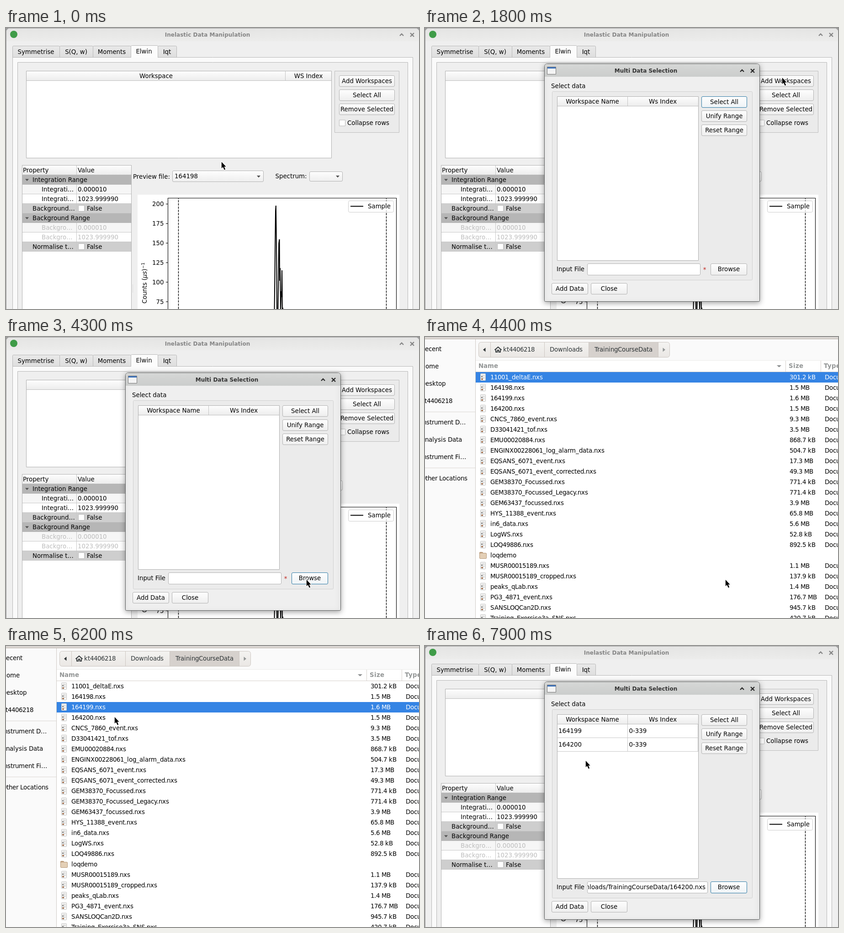
Write an HTML page with a canvas that moves like this. It is 904 px wide and 617 px high and loops after 8000 ms.

```html
<!DOCTYPE html>
<html lang="en">
<head>
<meta charset="utf-8">
<title>Adding workspaces</title>
<style>
html, body { margin: 0; width: 100%; height: 100%; overflow: hidden; background: #efefef; }
canvas { display: block; width: 904px; height: 617px; }
</style>
</head>
<body>
<canvas id="stage" width="904" height="617"></canvas>
<script>
const c = document.getElementById('stage').getContext('2d');
const LOOP = 8000, STEP = 100;
const FAMILY = '"DejaVu Sans", sans-serif';
const UI = `13.33px ${FAMILY}`, UI_BOLD = `bold 13.33px ${FAMILY}`, TITLE = `bold 12px ${FAMILY}`;

// ---------- drawing helpers ----------
function text(str, x, middle, { font = UI, color = '#000', align = 'left' } = {}) {
  c.font = font;
  c.fillStyle = color;
  c.textAlign = align;
  c.fillText(str, x, Math.floor(middle + 5));
}
const centered = (str, x, y, options) => text(str, x, y, { ...options, align: 'center' });

// Text whose glyphs all advance by whole pixels.
function snapped(str, x, middle, options) {
  const width = s => c.measureText(s).width;
  [...str].forEach((glyph, i) => {
    text(glyph, x, middle, options);
    const next = str[i + 1] ?? '';
    x += Math.round(width(glyph + next) - width(next));
  });
}

function fill(x1, y1, x2, y2, color) {
  c.fillStyle = color;
  c.fillRect(x1, y1, x2 - x1, y2 - y1);
}
function box(x1, y1, x2, y2, color, border, radius = 0) {
  c.beginPath();
  c.roundRect(x1 + .5, y1 + .5, x2 - x1 - 1, y2 - y1 - 1, radius);
  c.fillStyle = color;
  c.fill();
  c.strokeStyle = border;
  c.lineWidth = 1;
  c.stroke();
}
function path(points, color, width, close) {
  c.beginPath();
  points.forEach(([x, y]) => c.lineTo(x, y));
  if (close) c.closePath();
  c.strokeStyle = color;
  c.lineWidth = width;
  c.stroke();
}
function shape(points, color) {
  c.beginPath();
  points.forEach(([x, y]) => c.lineTo(x, y));
  c.fillStyle = color;
  c.fill();
}
const hline = (x1, x2, y, color) => fill(x1, y, x2, y + 1, color);
const vline = (x, y1, y2, color) => fill(x, y1, x + 1, y2, color);
const downArrow = (x, y, color = '#505050', w = 4) => shape([[x - w, y - 2], [x + w, y - 2], [x, y + 2.5]], color);

function shade(y1, y2, top, bottom) {
  const g = c.createLinearGradient(0, y1, 0, y2);
  g.addColorStop(0, top);
  g.addColorStop(1, bottom);
  return g;
}

// ---------- widgets ----------
function button(label, x1, y1, x2, y2 = y1 + 25, focused = false) {
  box(x1, y1, x2, y2, shade(y1, y2, '#fefefe', focused ? '#eef3f6' : '#eeeeee'), focused ? '#2f7ba6' : '#b3b3b3', 2.5);
  centered(label, (x1 + x2) / 2, (y1 + y2) / 2 - .5);
}
function combo(label, x1, y1, x2, y2) {
  button('', x1, y1, x2, y2);
  text(label, x1 + 5, 325.5);
  downArrow(x2 - 11, 326);
}
function checkbox(x, middle, label, labelX) {
  box(x, middle - 7, x + 14, middle + 7, '#fff', '#bababa');
  text(label, labelX, middle);
}
function header(x1, y1, x2, y2, divider) {
  fill(x1, y1, x2, y2, shade(y1, y2, '#fdfdfd', '#ededed'));
  hline(x1, x2, y2, '#bdbdbd');
  vline(divider, y1, y2, '#c4c4c4');
}
function windowButtons(x, y, color) {
  path([[x - 4, y + 2], [x, y - 2], [x + 4, y + 2]], color, 2.4);
  path([[x + 19, y - 4], [x + 27, y + 4]], color, 2.4);
  path([[x + 27, y - 4], [x + 19, y + 4]], color, 2.4);
}

// ---------- main window ----------
function propertyTree() {
  fill(35, 301, 275, 617, '#b4b4b4');
  fill(36, 302, 274, 617, '#fff');
  header(36, 302, 274, 322, 154);
  text('Property', 37, 312);
  text('Value', 157, 312);
  const rows = [
    ['group', 'Integration Range'], ['item', 'Integrati…', '0.000010'], ['item', 'Integrati…', '1023.999990'],
    ['flag', 'Background…'],
    ['group', 'Background Range'], ['off', 'Backgro…', '0.000010'], ['off', 'Backgro…', '1023.999990'],
    ['flag', 'Normalise t…']
  ];
  rows.forEach(([kind, name, value], i) => {
    const top = 323 + 21 * i, mid = top + 10.5;
    if (kind === 'group') {
      fill(36, top, 274, top + 21, '#b6b6b6');
      downArrow(46, mid);
      text(name, 58, mid);
      return;
    }
    fill(36, top, 274, top + 21, kind === 'flag' ? '#cecece' : i % 4 === 1 ? '#f6f6f6' : '#fff');
    hline(36, 274, top + 20, '#c8c8c8');
    vline(154, top, top + 21, '#c8c8c8');
    if (kind === 'flag') {
      text(name, 58, mid);
      checkbox(158, mid - .5, 'False', 177);
    } else {
      const color = kind === 'off' ? '#bdbdbd' : '#000';
      text(name, 78, mid, { color });
      text(value, 157, mid, { color });
    }
  });
}

function axisTitle() {
  c.save();
  c.translate(307.5, 605);
  c.rotate(-Math.PI / 2);
  let x = 0;
  const parts = [['Counts (', '', 13.3, 0], ['µs', 'italic ', 13.3, 0], [')', '', 13.3, 0], ['−1', '', 9.3, -5]];
  for (const [str, style, size, rise] of parts) {
    text(str, x, rise - 5, { font: `${style}${size}px ${FAMILY}` });
    x += c.measureText(str).width;
  }
  c.restore();
}

function plot() {
  fill(288, 366, 861, 617, '#fff');
  c.setLineDash([5, 2.1]);
  for (const x of [377.5, 832.5]) path([[x, 617], [x, 374]], '#000', 1.33);
  c.setLineDash([]);
  path([[587.5, 622], [590, 402], [590.8, 390], [592, 480], [593, 622], [595.3, 622], [597.2, 473],
    [598.5, 464], [599, 555], [600, 527], [601.2, 622], [602.5, 578], [603.3, 591], [604, 532],
    [605, 622], [605.7, 614], [606.5, 622]], '#000', 2);
  path([[354.5, 620], [354.5, 373.5], [854.5, 373.5], [854.5, 620]], '#000', 1.1);
  for (let i = 0; i < 6; i++) {
    const y = 386.5 + 42.9 * i;
    path([[350, y], [354, y]], '#000', 1.1);
    text(200 - 25 * i, 345.5, y, { align: 'right' });
  }
  axisTitle();
  box(749, 379, 849, 405, 'rgba(255,255,255,.8)', '#cccccc', 3);
  path([[754, 391.5], [782, 391.5]], '#000', 2);
  text('Sample', 792, 391.5);
}

function mainWindow() {
  fill(0, 0, 904, 617, '#9c9c9c');
  c.beginPath();
  c.roundRect(1, 1, 903, 640, [7, 7, 0, 0]);
  c.fillStyle = '#efefef';
  c.fill();
  c.beginPath();
  c.roundRect(1, 1, 903, 28, [7, 7, 0, 0]);
  c.fillStyle = shade(0, 29, '#e4e4e3', '#ececeb');
  c.fill();
  c.beginPath();
  c.arc(17, 14, 8, 0, 7);
  c.fillStyle = '#3f9c48';
  c.fill();
  centered('Inelastic Data Manipulation', 441, 14, { font: TITLE, color: '#858585' });
  windowButtons(866, 15, '#858585');

  box(14, 64, 891, 640, '#fafafa', '#b8b8b8');
  const tabs = [['Symmetrise', 14, 118], ['S(Q, w)', 117, 191], ['Moments', 190, 274], ['Iqt', 332, 374]];
  for (const [name, x1, x2] of tabs) {
    box(x1, 39, x2, 65, shade(39, 65, '#e9e9e9', '#dedede'), '#b8b8b8', [2, 2, 0, 0]);
    centered(name, (x1 + x2) / 2 - .5, 52);
  }
  box(273, 38, 333, 68, '#fcfcfc', '#b8b8b8', [2, 2, 0, 0]);
  fill(273, 65, 333, 69, '#fafafa');
  centered('Elwin', 302, 51.5);

  box(25, 75, 880, 640, '#efefef', '#b8b8b8');
  box(44, 94, 713, 286, '#fff', '#b0b0b0');
  header(45, 95, 712, 115, 611);
  centered('Workspace', 328.5, 105);
  centered('WS Index', 662, 105);

  box(719, 94, 861, 230, '#ebebeb', '#bdbdbd');
  ['Add Workspaces', 'Select All', 'Remove Selected'].forEach((name, i) => button(name, 729, 104 + 31 * i, 851));
  checkbox(729, 208.5, 'Collapse rows', 747);

  propertyTree();
  for (let y = 564; y < 581; y += 3) fill(277, y, 278, y + 1, '#b8b8b8');
  text('Preview file:', 278, 326);
  combo('164198', 364, 313, 564, 338);
  text('Spectrum:', 589.5, 325.5);
  combo('', 664, 315, 737, 337);
  plot();
}

// ---------- selection dialog ----------
function selectionDialog({ focus, path: filePath, rows }) {
  c.save();
  c.shadowColor = 'rgba(0,0,0,.35)';
  c.shadowBlur = 12;
  c.shadowOffsetY = 3;
  box(261, 78, 733, 601, '#efefef', '#5c5e5e', [6, 6, 2, 2]);
  c.restore();
  c.beginPath();
  c.roundRect(262, 79, 470, 28, [5, 5, 0, 0]);
  c.fillStyle = shade(79, 107, '#d6d7d6', '#cbcdcc');
  c.fill();
  box(267, 85, 287, 102, '#f4f4f4', '#777');
  fill(268, 86, 286, 89, '#3f74bd');
  centered('Multi Data Selection', 483.5, 93.5, { font: TITLE, color: '#333' });
  windowButtons(694, 94, '#2b2b2b');

  text('Select data', 276, 127.5);
  box(278, 139, 717, 554, '#ebebeb', '#d0d0d0', 2);
  box(289, 150, 599, 511, '#fff', '#b0b0b0');
  header(290, 151, 598, 171, 443);
  centered('Workspace Name', 366.5, 161);
  centered('Ws Index', 520.5, 161);
  rows.forEach((name, i) => {
    const top = 172 + 30 * i;
    text(name, 292, top + 14.5);
    text('0-339', 446.5, top + 14.5);
    hline(290, 598, top + 29, '#c8c8c8');
    vline(443, top, top + 30, '#c8c8c8');
    vline(597, top, top + 30, '#c8c8c8');
  });
  ['Select All', 'Unify Range', 'Reset Range'].forEach((name, i) =>
    button(name, 605, 150 + 31 * i, 705, undefined, focus === name));

  text('Input File', 288, 529.5);
  const right = filePath ? 619 : 603;
  box(355, 517, right, 543, '#fff', '#b3b3b3', 2.5);
  if (filePath) {
    c.save();
    c.beginPath();
    c.rect(356, 518, right - 358, 24);
    c.clip();
    text(filePath, right - 5, 529.5, { align: 'right' });
    c.restore();
  } else {
    centered('*', 612, 530, { color: '#c0241c' });
  }
  button('Browse', 625, 517, 705, 543, focus === 'Browse');
  button('Add Data', 277, 560, 357);
  button('Close', 363, 560, 443);
}

// ---------- file chooser ----------
const files = `11001_deltaE.nxs 301.2 kB|164198.nxs 1.5 MB|164199.nxs 1.6 MB|164200.nxs 1.5 MB
CNCS_7860_event.nxs 9.3 MB|D33041421_tof.nxs 3.5 MB|EMU00020884.nxs 868.7 kB
ENGINX00228061_log_alarm_data.nxs 504.7 kB|EQSANS_6071_event.nxs 17.3 MB
EQSANS_6071_event_corrected.nxs 49.3 MB|GEM38370_Focussed.nxs 771.4 kB
GEM38370_Focussed_Legacy.nxs 771.4 kB|GEM63437_focussed.nxs 3.9 MB|HYS_11388_event.nxs 65.8 MB
in6_data.nxs 5.6 MB|LogWS.nxs 52.8 kB|LOQ49886.nxs 892.5 kB|loqdemo|MUSR00015189.nxs 1.1 MB
MUSR00015189_cropped.nxs 137.9 kB|peaks_qLab.nxs 1.4 MB|PG3_4871_event.nxs 176.7 MB
SANSLOQCan2D.nxs 945.7 kB|Training_Exercise3a_SNS.nxs 420.7 kB`
  .split(/[|\n]/).map(line => line.match(/^(\S+) ?(.*)$/).slice(1));

const places = [['Recent', 26], ['Home', 64], ['Desktop', 102], ['kt4406218', 140], ['Instrument D…', 187],
  ['Analysis Data', 225], ['Instrument Fi…', 263], ['Other Locations', 310]];

function fileIcon(y) {
  box(121, y - 8, 133, y + 8, '#fdfdfd', '#bcbcba', 1);
  for (const dy of [-5, -3, 0, 2]) hline(123, 131, y + dy, '#c6c6c4');
  fill(123, y - 2, 126, y, '#777');
  fill(123, y + 3, 127, y + 6, '#85695a');
  fill(124, y + 3, 126, y + 5, '#d98a52');
}
function folderIcon(y) {
  box(119, y - 7, 127, y - 2, '#c9a988', '#b0906f', 1);
  box(119, y - 5, 135, y + 8, '#e3cfb6', '#b89a7c', 1.5);
}

function pathBar() {
  box(117, 11, 536, 45, shade(11, 45, '#f4f3f1', '#eae7e4'), '#cdc7c2', 5);
  fill(358, 12, 510, 44, '#d6d1cd');
  for (const x of [143, 261, 358, 510]) vline(x, 12, 44, '#cdc7c2');
  shape([[132.5, 23.5], [132.5, 32.5], [127, 28]], '#2e3436');
  shape([[520.5, 23.5], [520.5, 32.5], [526, 28]], '#929595');
  path([[152.5, 28.5], [160, 22], [167.5, 28.5]], '#2e3436', 2);
  path([[155, 28], [155, 33], [158.5, 33], [158.5, 29], [161.5, 29], [161.5, 33], [165, 33], [165, 28]], '#2e3436', 1.8);
  const crumbs = [['kt4406218', 171], ['Downloads', 273], ['TrainingCourseData', 371]];
  for (const [name, x] of crumbs) snapped(name, x, 27, { color: '#2e3436' });
}

function fileChooser(selected) {
  fill(0, 0, 904, 617, '#fafafa');
  fill(0, 0, 904, 5, '#dad6d2');
  hline(0, 904, 4, '#bfb8b1');
  places.forEach(([name, y]) => snapped(name, -9, y));
  hline(0, 110, 164, '#dcd8d4');
  hline(0, 110, 287, '#dcd8d4');
  vline(110, 5, 617, '#d0cbc6');
  pathBar();

  fill(111, 51, 904, 617, '#fff');
  hline(111, 904, 51, '#ececea');
  hline(111, 904, 76, '#d5d0cc');
  vline(789, 52, 76, '#d5d0cc');
  vline(866, 52, 76, '#d5d0cc');
  const head = { font: UI_BOLD, color: '#929595' };
  snapped('Name', 117, 63, head);
  snapped('Size', 796, 63, head);
  snapped('Type', 873, 63, head);
  downArrow(775, 64, '#8b8e8f', 5);

  files.forEach(([name, size], i) => {
    const y = 88 + 23 * i;
    const style = { color: selected.includes(i) ? '#fff' : '#000' };
    if (selected.includes(i)) fill(111, y - 11, 904, y + 12, '#3584e4');
    snapped(name, 143, y, style);
    if (!size) return folderIcon(y);
    fileIcon(y);
    snapped(size, 798, y, style);
    snapped('Document', 875, y, style);
  });
}

// ---------- pointer ----------
const track = [
  [100, 471, 293], [1000, 775, 118], [1300, 781, 108], [2300, 781, 108], [2400, 760, 125],
  [2700, 760, 125], [3200, 597, 300], [3600, 631, 442], [3900, 657, 532], [4400, 657, 532],
  [4500, 656, 530], [4800, 656, 530], [5500, 258, 127], [5800, 257, 126], [6000, 247, 143],
  [6100, 247, 143], [6200, 237, 155], [6500, 237, 155], [7000, 330, -30], [7700, 370, -30],
  [7800, 361, 215], [7900, 351, 251]
];
function pointerAt(t) {
  const next = track.findIndex(key => key[0] >= t);
  if (next <= 0) return track[0].slice(1);
  const [t0, x0, y0] = track[next - 1], [t1, x1, y1] = track[next];
  const u = (t - t0) / (t1 - t0), k = u * u * (3 - 2 * u);
  return [Math.round(x0 + (x1 - x0) * k), Math.round(y0 + (y1 - y0) * k)];
}
function pointer(t) {
  const [x, y] = pointerAt(t);
  const outline = [[.8, 1], [.8, 15], [4, 12.3], [6.8, 18.6], [9.2, 17.5], [6.5, 11.5], [10.6, 11.5]]
    .map(([dx, dy]) => [x + dx, y + dy]);
  path(outline, '#fff', 2, true);
  shape(outline, '#000');
}

// ---------- timeline ----------
function draw(t) {
  if (t >= 4400 && t < 7600) {
    fileChooser(t < 5600 ? [0] : t < 6500 ? [2] : [2, 3]);
  } else {
    mainWindow();
    const loaded = t >= 7700;
    if (t >= 1700) selectionDialog({
      focus: t < 4200 ? 'Select All' : 'Browse',
      path: loaded ? '/Downloads/TrainingCourseData/164200.nxs' : '',
      rows: loaded ? ['164199', '164200'] : []
    });
  }
  pointer(t);
}
function tick() {
  draw(Math.floor(performance.now() % LOOP / STEP) * STEP);
  requestAnimationFrame(tick);
}
tick();
</script>
</body>
</html>
```
